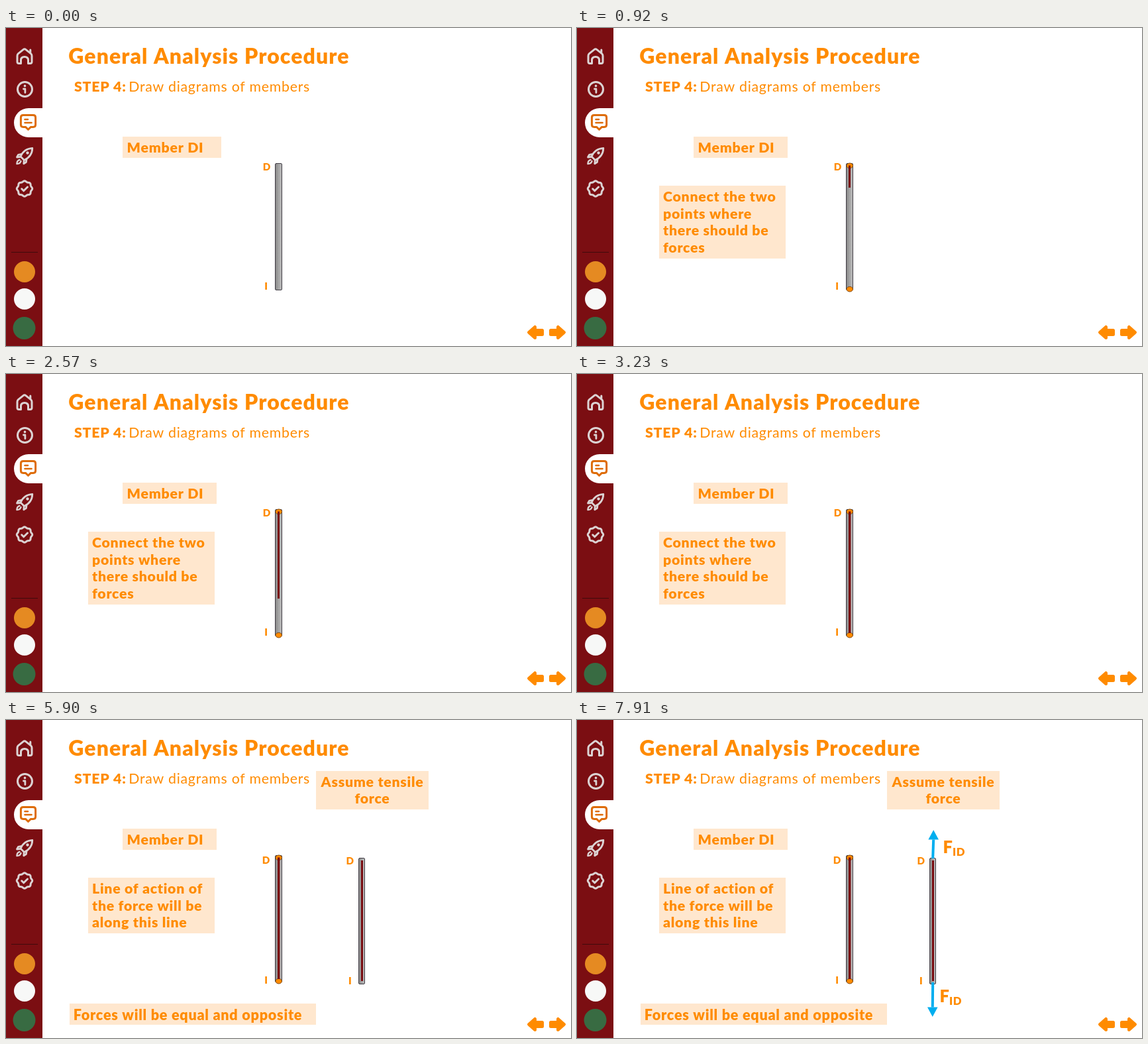
An HTML page with a canvas that plays this animation: 853 px wide and 480 px high, repeating every 8 s.

```html
<!DOCTYPE html>
<html lang="en">
<head>
<meta charset="utf-8">
<title>General Analysis Procedure</title>
<style>
  html, body { margin: 0; width: 100%; height: 100%; overflow: hidden; background: #fff; }
  canvas { display: block; width: 100%; height: 100%; }
</style>
</head>
<body>
<canvas id="stage" width="853" height="480"></canvas>
<script>
const ctx = document.getElementById('stage').getContext('2d');
const LOOP = 8000;
const ORANGE = '#ff8b00', PEACH = '#ffe7ce', MAROON = '#7b0e12', ICON = '#dcd3d3', BLUE = '#00aeef';
const BOLD = 900, BODY = 21.3, LABEL = 15.2, TRACKING = 0.034;

// The line grows in steps of 330 ms from 590 ms on.
const LINE_ENDS = [221, 241, 256, 269, 285, 311, 339, 359, 391];
const LINE_START = 590, LINE_STEP = 330;

function text(str, x, y, size = BODY, weight = BOLD, align = 'left') {
  ctx.font = `${weight} ${size}px Lato, "Open Sans", sans-serif`;
  ctx.letterSpacing = `${size * TRACKING}px`;
  ctx.textAlign = align;
  ctx.fillStyle = ORANGE;
  ctx.fillText(str, x, y);
}

function rect(x1, y1, x2, y2, color) {
  ctx.fillStyle = color;
  ctx.fillRect(x1, y1, x2 - x1, y2 - y1);
}

function disc(x, y, r, color) {
  ctx.beginPath();
  ctx.arc(x, y, r, 0, Math.PI * 2);
  ctx.fillStyle = color;
  ctx.fill();
}

function polygon(points) {
  ctx.beginPath();
  points.forEach(([x, y]) => ctx.lineTo(x, y));
  ctx.closePath();
}

function stroke(d, width = 3, color = ICON) {
  ctx.strokeStyle = color;
  ctx.lineWidth = width;
  ctx.lineCap = ctx.lineJoin = 'round';
  ctx.stroke(new Path2D(d));
}

function note(x1, y1, x2, y2, lines, textX, baseline, align = 'left', size = BODY) {
  rect(x1, y1, x2, y2, PEACH);
  lines.forEach((line, i) => text(line, textX, baseline + i * 25.7, size, BOLD, align));
}

function badge(cx, cy) {
  ctx.beginPath();
  for (let i = 0; i <= 96; i++) {
    const a = i / 96 * Math.PI * 2;
    const r = 11 + 0.7 * Math.cos(8 * a);
    ctx.lineTo(cx + r * Math.cos(a), cy + r * Math.sin(a));
  }
  ctx.closePath();
  ctx.strokeStyle = ICON;
  ctx.lineWidth = 3;
  ctx.stroke();
  stroke(`M${cx - 4.3} ${cy + .3} l3 3 l5.8 -5.8`);
}

function sidebar() {
  rect(0, 0, 55, 480, MAROON);
  rect(8, 338, 48, 339, '#3f0a0c');

  // home
  stroke('M22.5 53.5 H19.5 Q17 53.5 17 51 V42 Q17 40 18.5 38.7 L26 32.6 Q28 31 30 32.6 L37.5 38.7 Q39 40 39 42 V51 Q39 53.5 36.5 53.5 H33.5 V48.5 Q33.5 43.5 28 43.5 Q22.5 43.5 22.5 48.5 Z M36.8 37 V33', 3);
  // info
  stroke('M39.5 92.5 a11 11 0 1 1 -22 0 a11 11 0 1 1 22 0');
  disc(28.5, 87.4, 1.8, ICON);
  stroke('M26.5 92 H28.9 V97.5', 2.8);

  // active tab
  ctx.beginPath();
  ctx.roundRect(12, 121, 43, 44, [22, 0, 0, 22]);
  ctx.fillStyle = '#fff';
  ctx.fill();
  stroke('M26 131.5 H41 Q44.6 131.5 44.6 135 V146 Q44.6 149.4 41 149.4 H37.5 L33.5 153.3 L29.5 149.4 H26 Q22.4 149.4 22.4 146 V135 Q22.4 131.5 26 131.5 Z', 3, '#de6c08');
  stroke('M28.5 138 H33 M28.5 143 H38.5', 2.6, '#de6c08');

  // rocket
  stroke('M22 194 Q27 182 39.8 181.3 Q39.5 194 27.5 199.5 Z', 2.8);
  stroke('M23.5 190.5 L18.5 191.3 L16.5 195 L22 194.5 M31 198 L30.4 202.5 L26.8 204.8 L27.2 199.5', 2.8);
  stroke('M20.5 199 Q16.5 200 16.4 205 Q21.5 205 22.5 201', 2.4);
  disc(32.5, 188.5, 2.2, ICON);

  badge(28, 242.5);

  disc(28, 368, 16, '#e58a22');
  disc(28, 409, 16, '#f7f8f7');
  disc(27.5, 453, 17, '#386b42');
}

function navArrow(tip, dir) {
  const outline = [[0, 0], [9, -8], [9, -3], [20, -3], [20, 3], [9, 3], [9, 8]];
  polygon(outline.map(([x, y]) => [tip + dir * x, 459.5 + y]));
  ctx.fillStyle = ctx.strokeStyle = ORANGE;
  ctx.lineWidth = 5;
  ctx.lineJoin = 'round';
  ctx.fill();
  ctx.stroke();
}

function bar(x1, y1, x2, y2) {
  const shade = ctx.createLinearGradient(x1, 0, x2, 0);
  shade.addColorStop(0, '#858585');
  shade.addColorStop(0.5, '#a5a5a5');
  shade.addColorStop(1, '#bdbdbd');
  ctx.beginPath();
  ctx.roundRect(x1, y1, x2 - x1, y2 - y1, 1.5);
  ctx.fillStyle = shade;
  ctx.fill();
  ctx.strokeStyle = '#413d45';
  ctx.lineWidth = 1;
  ctx.stroke();
}

function joint(x, y) {
  ctx.beginPath();
  ctx.ellipse(x, y, 4.8, 3.8, 0, 0, Math.PI * 2);
  ctx.fillStyle = ORANGE;
  ctx.fill();
  ctx.strokeStyle = '#7d4a16';
  ctx.lineWidth = 1;
  ctx.stroke();
}

function force(x1, y1, x2, tip, dir) {
  const base = tip - dir * 14.5;
  ctx.beginPath();
  ctx.moveTo(x1, y1);
  ctx.lineTo(x2, base);
  ctx.strokeStyle = BLUE;
  ctx.lineWidth = 4;
  ctx.lineCap = 'butt';
  ctx.stroke();
  polygon([[x2, tip], [x2 - 7.8, base], [x2 + 7.8, base]]);
  ctx.fillStyle = BLUE;
  ctx.fill();
}

function forceLabel(x, y) {
  text('F', x, y, 25.5);
  text('ID', x + 14.5, y + 4, 16.8);
}

function draw(t) {
  const joined = t >= 260, lineDone = t >= 3230, paired = t >= 5900;

  rect(0, 0, 853, 480, '#fff');
  sidebar();
  navArrow(789.5, 1);
  navArrow(842.5, -1);

  text('General Analysis Procedure', 94.3, 53.5, 32);
  text('STEP 4:', 103, 95.5);
  text('Draw diagrams of members', 185.2, 95.5, BODY, 400);

  note(176, 164, joined ? 318 : 325, 196, ['Member DI'], 182.6, 188.3);

  bar(406.5, 204.5, 416.5, 395.5);
  text('D', paired ? 386.7 : 387.7, paired ? 217.2 : 215.2, LABEL);
  text('I', 390.2, paired ? 398.2 : 395.2, LABEL);

  if (joined) {
    joint(411.8, 207.8);
    joint(411.8, 394.2);
    if (t < 3560) {
      note(124, 238, 315, 348, ['Connect the two', 'points where', 'there should be', 'forces'], 130, 261.8);
    } else {
      note(124, 238, 315, 322, ['Line of action of', 'the force will be', 'along this line'], 130, 261.8);
    }
  }

  if (t >= LINE_START) {
    const step = Math.min(Math.floor((t - LINE_START) / LINE_STEP), LINE_ENDS.length - 1);
    rect(410, 207.5, lineDone ? 413.4 : 413, LINE_ENDS[step], MAROON);
  }

  if (paired) {
    note(468, 77, 638, 135, ['Assume tensile', 'force'], 553, 100.7, 'center');
    note(96, 428, 468, 460, ['Forces will be equal and opposite'], 101.8, 452.7, 'left', 21.6);
    bar(532.5, 208.5, 541.5, 398.5);
    rect(536, 212, 539, 394, MAROON);
    text('D', 513.5, 218.2, LABEL);
    text('I', 517, 398.7, LABEL);
  }

  if (t >= 7240) {
    force(537.2, 209, 538.2, 166, -1);
    force(537.2, 396, 536.8, 448, 1);
  }

  if (t >= 7910) {
    forceLabel(552.5, 201);
    forceLabel(547.5, 426);
  }
}

const start = performance.now();
function tick() {
  draw((performance.now() - start) % LOOP);
  requestAnimationFrame(tick);
}
tick();
</script>
</body>
</html>
```
